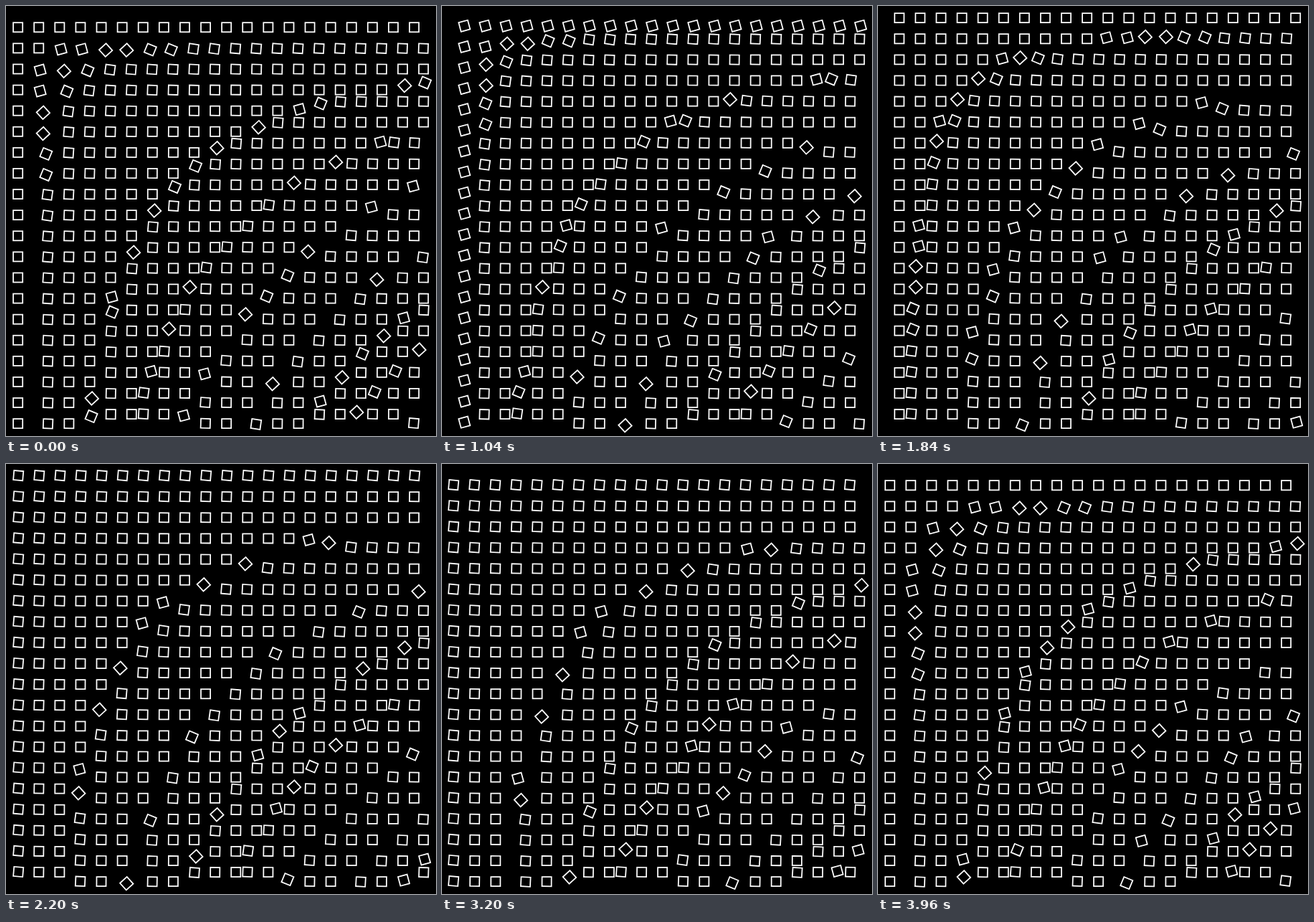
An HTML page with a canvas that plays this animation: 600 by 600 pixels, repeating every 4 s.

```html
<!DOCTYPE html>
<html lang="en">
<head>
<meta charset="utf-8">
<title>Turning squares</title>
<style>
  html, body { margin: 0; width: 100%; height: 100%; overflow: hidden; background: #000; }
  canvas { display: block; width: 600px; height: 600px; }
</style>
</head>
<body>
<canvas id="stage" width="600" height="600"></canvas>
<script>
  const ctx = document.getElementById('stage').getContext('2d');
  const COUNT = 20, ORIGIN = 23.2, PITCH = 29.1, SIDE = 13.1, LINE = 1.75;
  const STEP_MS = 40, STEPS = 100, QUARTER = 25;
  const SNAP = [0, 0.168, 0.47, 0.75, 0.91];

  // Quick swing, then a slow settle into the corner.
  const swing = k => k < SNAP.length ? SNAP[k] : 1 - 0.055 * Math.exp(-0.2 * (k - 5));

  function turn(step) {
    const k = step % STEPS;
    return -(Math.floor(k / QUARTER) + swing(k % QUARTER)) * Math.PI / 2;
  }

  function drawSquare(col, row, angle) {
    ctx.save();
    ctx.translate(ORIGIN + col * PITCH, ORIGIN + row * PITCH);
    ctx.rotate(angle);
    ctx.strokeRect(-SIDE, 0, SIDE, SIDE);
    ctx.restore();
  }

  function draw(step) {
    ctx.fillStyle = '#000';
    ctx.fillRect(0, 0, 600, 600);
    ctx.strokeStyle = '#fff';
    ctx.lineWidth = LINE;
    for (let row = 0; row < COUNT; row++) {
      for (let col = 0; col < COUNT; col++) {
        // Each square runs ahead by half the product of its grid indices.
        drawSquare(col, row, turn(step + Math.floor(row * col / 2)));
      }
    }
  }

  const start = performance.now();
  let shown = -1;
  function tick() {
    const step = Math.floor((performance.now() - start) / STEP_MS) % STEPS;
    if (step !== shown) draw(shown = step);
    requestAnimationFrame(tick);
  }
  tick();
</script>
</body>
</html>
```
